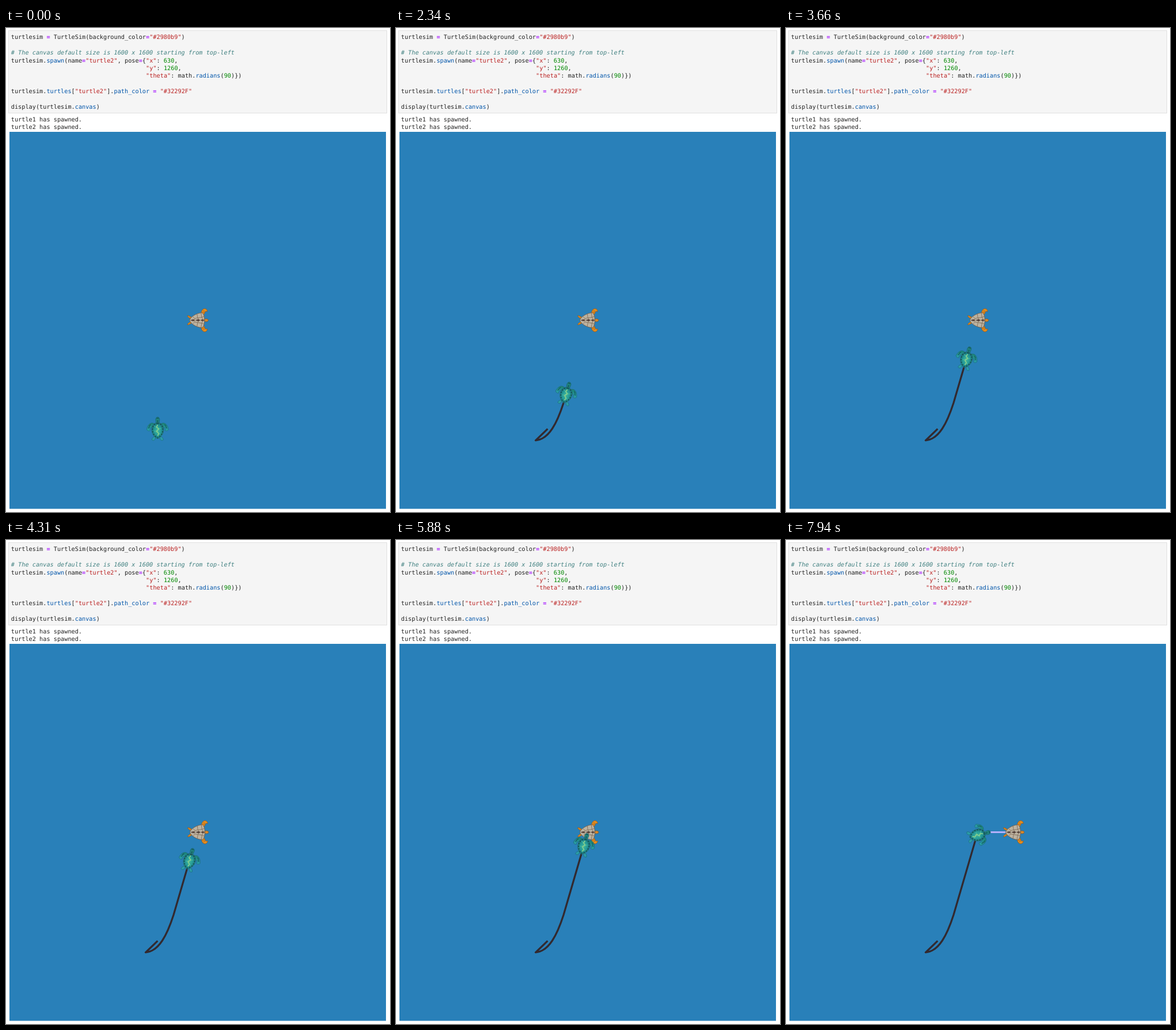
Animation of 667 by 839 pixels, one loop 8000 ms. Source, as an HTML page:

```html
<!DOCTYPE html>
<html lang="en">
<head>
<meta charset="utf-8">
<title>Turtle follower</title>
<style>
  html, body { margin: 0; width: 100%; height: 100%; overflow: hidden; background: #fff; }
  svg { display: block; width: 667px; height: 839px; }
  text {
    font: 10.24px "DejaVu Sans Mono", monospace;
    fill: #212121; white-space: pre; text-rendering: geometricPrecision;
  }
  .op { fill: #a2f; font-weight: bold; }
  .str { fill: #ba2121; }
  .num { fill: #080; }
  .prop { fill: #05a; }
  .note { fill: #408080; font-style: italic; }
  .trail { fill: none; stroke-width: 3.2; stroke-linejoin: round; }
</style>
</head>
<body>
<svg viewBox="0 0 667 839">
  <defs>
    <radialGradient id="teal">
      <stop offset="0" stop-color="#43b79c"/>
      <stop offset=".55" stop-color="#259c98"/>
      <stop offset="1" stop-color="#187078"/>
    </radialGradient>
    <linearGradient id="fin" x1="0" y1="0" x2="0" y2="1">
      <stop offset="0" stop-color="#1c8474"/>
      <stop offset="1" stop-color="#2a9fae"/>
    </linearGradient>

    <!-- both halves are mirrored from one limb set -->
    <g id="tealLimbs" stroke="#1b6872" stroke-width=".6">
      <path d="M6-9C11-12 17-9 19 1C18 3.500 15 4 13 3C14-1 12-3 8-3Z" fill="url(#fin)"/>
      <path d="M4 13C7 13 10 16 10 19C8 21 5 20 4 17Z" fill="#2a9ba8"/>
      <path d="M12-7.500l3 3M14-4l2 3" stroke="#14555c" stroke-width="1.200" fill="none"/>
    </g>
    <g id="orangeLimbs" stroke="#8a4c10" stroke-width=".6" fill="#e58d1f">
      <path d="M6-12C7-16 8-19.500 12-20C15-20 17-18 17-15C15-16 13-15.500 12.500-13C12-10 9-9 6-9Z"/>
      <path d="M-7-4C-11-4-13-8-17.500-8C-18-6-14-3-10-2Z"/>
      <path d="M8-14l4 1M9.500-17l3 2M-14-6l2 2" fill="none"/>
    </g>
  </defs>

  <rect x="4.500" y="4.500" width="657" height="143" fill="#f5f5f5" stroke="#e0e0e0"/>
  <text x="8.800" y="19.300">turtlesim <tspan class="op">=</tspan> TurtleSim(background_color<tspan class="op">=</tspan><tspan class="str">"#2980b9"</tspan>)</text>
  <text x="8.800" y="46" class="note"># The canvas default size is 1600 x 1600 starting from top-left</text>
  <text x="8.800" y="59.500">turtlesim.<tspan class="prop">spawn</tspan>(name<tspan class="op">=</tspan><tspan class="str">"turtle2"</tspan>, pose<tspan class="op">=</tspan>{<tspan class="str">"x"</tspan>: <tspan class="num">630</tspan>,</text>
  <text x="243.100" y="72.900"><tspan class="str">"y"</tspan>: <tspan class="num">1260</tspan>,</text>
  <text x="243.100" y="86.300"><tspan class="str">"theta"</tspan>: math.<tspan class="prop">radians</tspan>(<tspan class="num">90</tspan>)})</text>
  <text x="8.800" y="113.100">turtlesim.<tspan class="prop">turtles</tspan>[<tspan class="str">"turtle2"</tspan>].<tspan class="prop">path_color</tspan> <tspan class="op">=</tspan> <tspan class="str">"#32292F"</tspan></text>
  <text x="8.800" y="139.900">display(turtlesim.<tspan class="prop">canvas</tspan>)</text>
  <text x="8.800" y="162">turtle1 has spawned.</text>
  <text x="8.800" y="175.400">turtle2 has spawned.</text>

  <rect x="6" y="180" width="654" height="653.500" fill="#2980b9"/>
  <path id="chase" class="trail" stroke="#32292f" d="M263.400 694.900L242.500 715C266 713 280 684 291 650L333 506.700"/>
  <path id="lead" class="trail" stroke="#b3b0fa"/>

  <g id="leader">
    <use href="#orangeLimbs"/>
    <use href="#orangeLimbs" transform="scale(1 -1)"/>
    <ellipse cx="14.500" rx="4" ry="2.500" fill="#d98a2c" stroke="#7a451a" stroke-width=".6"/>
    <path d="M-14 0C-12-6-3-12 7-13C11-12 12-6 12 0C12 6 11 12 7 13C-3 12-12 6-14 0Z" fill="#bdb3a1" stroke="#675442" stroke-width=".8"/>
    <path d="M-8-6L-5-3L-7 0L-5 3L-8 6M-1-11L0-4L3 0L0 4L-1 11M6-13L7-5L10 0L7 5L6 13M-5-3L0-4L7-5L12-7M-5 3L0 4L7 5L12 7" fill="none" stroke="#806d59" stroke-width=".9"/>
    <path d="M-13 0L-8-1.700L-4 0L1-1.900L5 0L8-1.700L13 0L8 1.700L5 0L1 1.900L-4 0L-8 1.700Z" fill="#54423b"/>
  </g>

  <g id="follower">
    <use href="#tealLimbs"/>
    <use href="#tealLimbs" transform="scale(-1 1)"/>
    <path d="M-2.500-9L-3.500-16C-3.500-22 3.500-22 3.500-16L2.500-9Z" fill="#1f837d" stroke="#17606a" stroke-width=".6"/>
    <path d="M-2-18.500h4M0-15v4" stroke="#145058" stroke-width="1.300"/>
    <path d="M0-11C7-11 11-5 10.500 2C10 10 5 15 0 17C-5 15-10 10-10.500 2C-11-5-7-11 0-11Z" fill="url(#teal)" stroke="#24737a" stroke-width=".7"/>
    <path d="M0-9.500C6-9.500 9.300-4 9 2C8.500 9 4 13.500 0 15.500C-4 13.500-8.500 9-9 2C-9.300-4-6-9.500 0-9.500Z" fill="none" stroke="#164c50" stroke-width="1.800" stroke-dasharray="2 2.600"/>
    <path d="M0-7L-2-3L2 0L-2 4L2 8L0 12" fill="none" stroke="#86cf8c" stroke-width="1.800"/>
    <path d="M-2-3L-6-5M2 0L6-1M-2 4L-6 4M2 8L5 9" stroke="#4fb9a0" stroke-width="1"/>
  </g>
</svg>
<script>
  const LOOP = 8000;
  const TURN = 7470;
  // first change, last change, count
  const bursts = [
    [0, 0, 1], [470, 470, 1], [1030, 1030, 1], [1530, 2250, 8], [2340, 3060, 8],
    [3160, 3410, 3], [3660, 3660, 1], [3810, 3810, 1], [3970, 4530, 6],
    [4720, 4720, 1], [4880, 5560, 7], [5690, 5690, 1], [5880, 6000, 2],
    [6160, 6410, 3], [6590, 6590, 1], [6780, 7190, 5], [7340, TURN, 2], [7630, 7940, 4]
  ];
  const ticks = bursts.flatMap(([from, to, n]) =>
    Array.from({ length: n }, (_, i) => from + (n > 1 ? (to - from) * i / (n - 1) : 0)));

  const [chase, lead, leader, follower] =
    ["chase", "lead", "leader", "follower"].map(id => document.getElementById(id));
  const total = chase.getTotalLength();
  const backUp = Math.hypot(20.9, 20.1);
  const mix = (a, b, u) => a + (b - a) * u;

  // speed is half the remaining distance per second
  function travelled(t) {
    if (t < 1030) return 0;
    if (t < 1530) return backUp;
    return total - 138.3 * Math.exp(-(Math.min(t, TURN) - 2250) / 2000);
  }

  function pose(t, s, u) {
    const p = chase.getPointAtLength(s);
    if (t < 1030) return [p.x, p.y, 0];
    const a = chase.getPointAtLength(s + 0.2);
    const b = chase.getPointAtLength(s + 1.2);
    const turn = Math.atan2(b.x - a.x, a.y - b.y) * 180 / Math.PI;
    return [mix(p.x, 335.3, u), mix(p.y, 511, u), mix(turn, 76, u)];
  }

  function leaderShift(t, u) {
    if (t < 470) return -0.5;
    if (t < 7340) return 0;
    return t < TURN ? 2 : 4 + 58 * u;
  }

  function draw(now) {
    const time = now % LOOP;
    const t = ticks.findLast(tick => tick <= time + 0.01);
    const u = Math.max(0, (t - TURN) / (7940 - TURN));
    const s = travelled(t);
    const [x, y, turn] = pose(t, s, u);
    const dx = leaderShift(t, u);

    chase.setAttribute("stroke-dasharray", `${s} 999`);
    chase.style.visibility = s ? "visible" : "hidden";
    lead.setAttribute("d", dx > 0 ? `M333 506.500h${dx}` : "");
    leader.setAttribute("transform", `translate(${333.3 + dx} 506.600)`);
    follower.setAttribute("transform", `translate(${x} ${y}) rotate(${turn})`);
  }

  const start = performance.now();
  function frame() {
    draw(performance.now() - start);
    requestAnimationFrame(frame);
  }
  frame();
</script>
</body>
</html>
```
